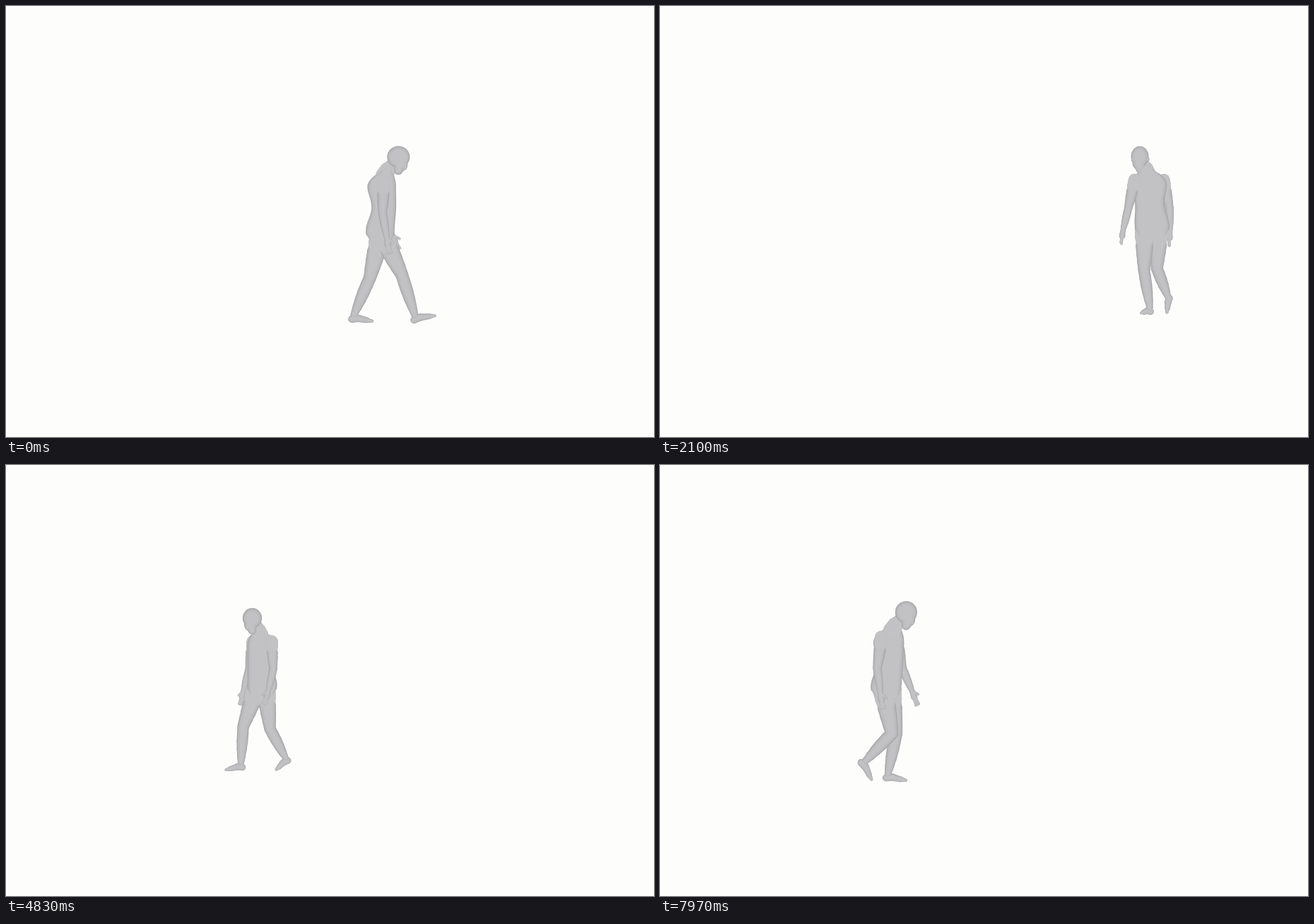
Animation of 917 by 611 pixels, one loop 8 s. Source, as an HTML page with a canvas:

```html
<!DOCTYPE html>
<html lang="en">
<head>
<meta charset="utf-8">
<title>Walking figure</title>
<style>
html, body { margin: 0; width: 100%; height: 100%; overflow: hidden; background: #fdfdfc; }
canvas { display: block; width: 100vw; height: 100vh; }
</style>
</head>
<body>
<canvas id="stage" width="917" height="611"></canvas>
<script>
const ctx = document.getElementById('stage').getContext('2d');
const LOOP = 8000, STRIDE = 1.176, STEP = 86, TOE_OFF = .54;
const CAMERA = 3500, HORIZON = 275, EYE = 165;
const THIGH = 59, SHANK = 54.5;
const RAD = Math.PI / 180, TAU = 2 * Math.PI;
const TONES = [[0, '#a6a6a9'], [1, '#b4b4b7'], [2.5, '#bdbdc0'], [5, '#c2c2c4']];

const wrap = v => v - Math.floor(v);
const mix = (a, b, k) => a.map((v, i) => v + (b[i] - v) * k);
const smooth = k => k * k * (3 - 2 * k);
const inset = (r, d) => r - Math.min(d, r * d * .12);

let hipX, depth, cos, sin, hipH;

// walks an oval, quicker round its ends
function place(t) {
  const a = .664 * (t - 1.7), turn = a + .07 * Math.sin(2 * a) - .07;
  const heading = (17 + 41 * t + 13 * Math.sin(.79 * (t - 1.2))) * RAD;
  hipX = 453.5 + 249 * Math.cos(turn);
  depth = 185 * Math.sin(turn + .1) - 15;
  cos = Math.cos(heading);
  sin = Math.sin(heading);
}

// local forward, left, up -> screen
function project([f, l, u], r = 0) {
  const z = f * sin + l * cos, s = CAMERA / (CAMERA + depth + z);
  return { x: hipX + (f * cos - l * sin) * s, y: HORIZON + (EYE - u) * s, r: r * s, s, z };
}

function bone(a, b, r0, r1, bulge) {
  return [0, .2, .4, .6, .8, 1].map(k =>
    project(mix(a, b, k), r0 + (r1 - r0) * k + bulge * Math.sin(Math.PI * k)));
}

function disc(x, y, rx, ry) {
  ctx.beginPath();
  ctx.ellipse(x, y, rx, ry, 0, 0, TAU);
  ctx.fill();
}

// chain of round joints; the first `open` joints carry no rim
function chain(points, d, open = 0) {
  let last = null;
  points.forEach((p, i) => {
    if (i < open && !d) return;
    const r = i < open ? p.r : inset(p.r, d);
    disc(p.x, p.y, r, r);
    if (last) {
      const dx = p.x - last.x, dy = p.y - last.y, n = Math.hypot(dx, dy) || 1;
      const nx = -dy / n, ny = dx / n;
      ctx.beginPath();
      ctx.moveTo(last.x + nx * last.r, last.y + ny * last.r);
      ctx.lineTo(p.x + nx * r, p.y + ny * r);
      ctx.lineTo(p.x - nx * r, p.y - ny * r);
      ctx.lineTo(last.x - nx * last.r, last.y - ny * last.r);
      ctx.fill();
    }
    last = { x: p.x, y: p.y, r };
  });
}

function paint(draw) {
  for (const [d, tone] of TONES) {
    ctx.fillStyle = tone;
    draw(d);
  }
}

// ankle position and foot pitch; phase 0 is the heel strike
function gait(phase) {
  if (phase < TOE_OFF) {
    return [STEP * (.5 - phase / TOE_OFF), 11, 18 * Math.max(0, 1 - phase * 10)];
  }
  const q = (phase - TOE_OFF) / (1 - TOE_OFF);
  const lift = Math.sin(Math.PI * q ** .8) ** 2;
  return [STEP * (smooth(q ** 1.8) - .5), 11 + 18 * lift, 18 * q ** 4 - 50 * lift];
}

function leg(side, phase) {
  const [f, h, pitch] = gait(phase);
  const hip = [0, side * 11, hipH - 1], ankle = [f, side * 10 - 6, h];
  const dy = h - hip[2];
  const reach = Math.min(Math.hypot(f, dy), THIGH + SHANK - .3);
  const bend = Math.acos((THIGH ** 2 + reach ** 2 - SHANK ** 2) / (2 * THIGH * reach));
  const aim = Math.atan2(dy, f) + bend;
  const knee = [THIGH * Math.cos(aim), side * 11.5 - 3, hip[2] + THIGH * Math.sin(aim)];
  const c = Math.cos(pitch * RAD), s = Math.sin(pitch * RAD);
  const sole = (x, y, r) =>
    project([f + x * c - y * s, ankle[1] + side * Math.max(0, x) * .14, h + x * s + y * c], r);
  const limb = [...bone(hip, knee, 14, 8.6, .6), ...bone(knee, ankle, 8.4, 4.7, 1.4)];
  const foot = [sole(-3, -6, 4.8), sole(6, -5, 5), sole(17, -7.5, 3.8), sole(25, -9, 2)];
  return {
    z: project(knee).z + project(ankle).z,
    draw: d => { chain(foot, d); chain(limb, d, 2); }
  };
}

function arm(side, upper, fore) {
  const along = (p, angle, len, out) => [p[0] + Math.sin(angle * RAD) * len,
    p[1] + side * out, p[2] - Math.cos(angle * RAD) * len];
  const shoulder = [1, side * 22.5 + 3.5, hipH + 70];
  const elbow = along(shoulder, upper, 41, 8);
  const wrist = along(elbow, fore, 34, 3);
  const palm = along(wrist, fore, 9, 0);
  const limb = [...bone(shoulder, elbow, 8.8, 5.8, .5),
    ...bone(elbow, wrist, 5.8, 3.6, .7), project(palm, 4.4)];
  const fingers = [-14, -4, 6, 16].map(spread => [
    project(along(palm, fore + spread * 2, 3, 0), 1.7),
    project(along(palm, fore + spread, 12, 0), 1.1)]);
  fingers.push([project(wrist, 2.2), project(along(wrist, fore + 42, 11, -1), 1.4)]);
  return {
    z: project(wrist).z + project(shoulder).z,
    draw: d => { fingers.forEach(p => chain(p, d)); chain(limb, d, 2); }
  };
}

// stacked oval slices, wide at hips and chest, closing at both ends
function torso(d) {
  const left = [], right = [];
  for (let u = d ? -13 : -3; u <= (d ? 91 : 83); u += 4) {
    const wave = Math.cos(TAU * (u - 5) / 61);
    const top = Math.max(0, u - 64) / 28, low = Math.max(0, -u) / 20;
    const close = 1 - top ** 2 - low ** 2;
    const p = project([u * .04 - 2 * wave + 6 * top ** 2, u * .05, hipH + u]);
    const r = Math.hypot((23.7 + 2 * wave) * sin, (17.8 + 1.4 * wave) * cos) * close * p.s;
    const e = r - (u < -5 || u > 83 ? 0 : Math.min(d, r * .5));
    left.push([p.x - e, p.y]);
    right.unshift([p.x + e, p.y]);
  }
  const ring = left.concat(right), n = ring.length;
  ctx.beginPath();
  for (let i = 0; i <= n; i++) {
    const a = ring[i % n], m = mix(a, ring[(i + 1) % n], .5);
    if (i) ctx.quadraticCurveTo(a[0], a[1], m[0], m[1]);
    else ctx.moveTo(m[0], m[1]);
  }
  ctx.fill();
}

function head() {
  const spot = (f, l, u, r) => project([24 + f, 9 + l, hipH + 104 + u], r);
  const neck = [project([4, 4.5, hipH + 79], 11), project([9, 5.5, hipH + 86], 10.5),
    spot(-5, 0, -8, 9.5)];
  const skull = spot(0, 0, 0);
  const jaw = [spot(0, 0, -2, 12), spot(3, 0, -10, 9.5), spot(0, 0, -18, 6)];
  const nose = [spot(9, 0, -9, 3), spot(9.5, 0, -15, 2)];
  const ears = [-1, 1].map(k => spot(-2, k * 11.5, -4, 2.4));
  const rx = Math.hypot(12.3 * sin, 15.3 * cos) * skull.s, ry = 14.8 * skull.s;
  paint(d => chain(neck, d, 2));
  paint(d => {
    chain(nose, d);
    ears.forEach(p => disc(p.x, p.y, inset(p.r, d), inset(p.r, d) * 1.5));
    chain(jaw, d);
    disc(skull.x, skull.y, rx - d, ry - d);
  });
}

function render(ms) {
  const t = Math.floor(ms * .03 + .15) / 30;
  const phase = wrap(t / STRIDE);
  place(t);
  hipH = 121.5 - 2.5 * Math.cos(2 * TAU * phase);

  const back = Math.cos(TAU * (phase + .1));
  const front = back * (.7 + 1.2 * Math.exp(-((t - 5.7) ** 2) / 2));
  const byDepth = (a, b) => b.z - a.z;
  const legs = [leg(-1, phase), leg(1, wrap(phase + .5))].sort(byDepth);
  const arms = [arm(1, 2 + 8 * front, 14 + 16 * front),
    arm(-1, 2 - 7 * back, 18 - 11 * back)].sort(byDepth);

  ctx.fillStyle = '#fdfdfc';
  ctx.fillRect(0, 0, 917, 611);
  paint(arms[0].draw);
  if (sin > 0) head();
  legs.forEach(part => paint(part.draw));
  paint(torso);
  if (sin <= 0) head();
  paint(arms[1].draw);
}

const start = performance.now();
function tick() {
  render((performance.now() - start) % LOOP);
  requestAnimationFrame(tick);
}
render(0);
requestAnimationFrame(tick);
</script>
</body>
</html>
```
